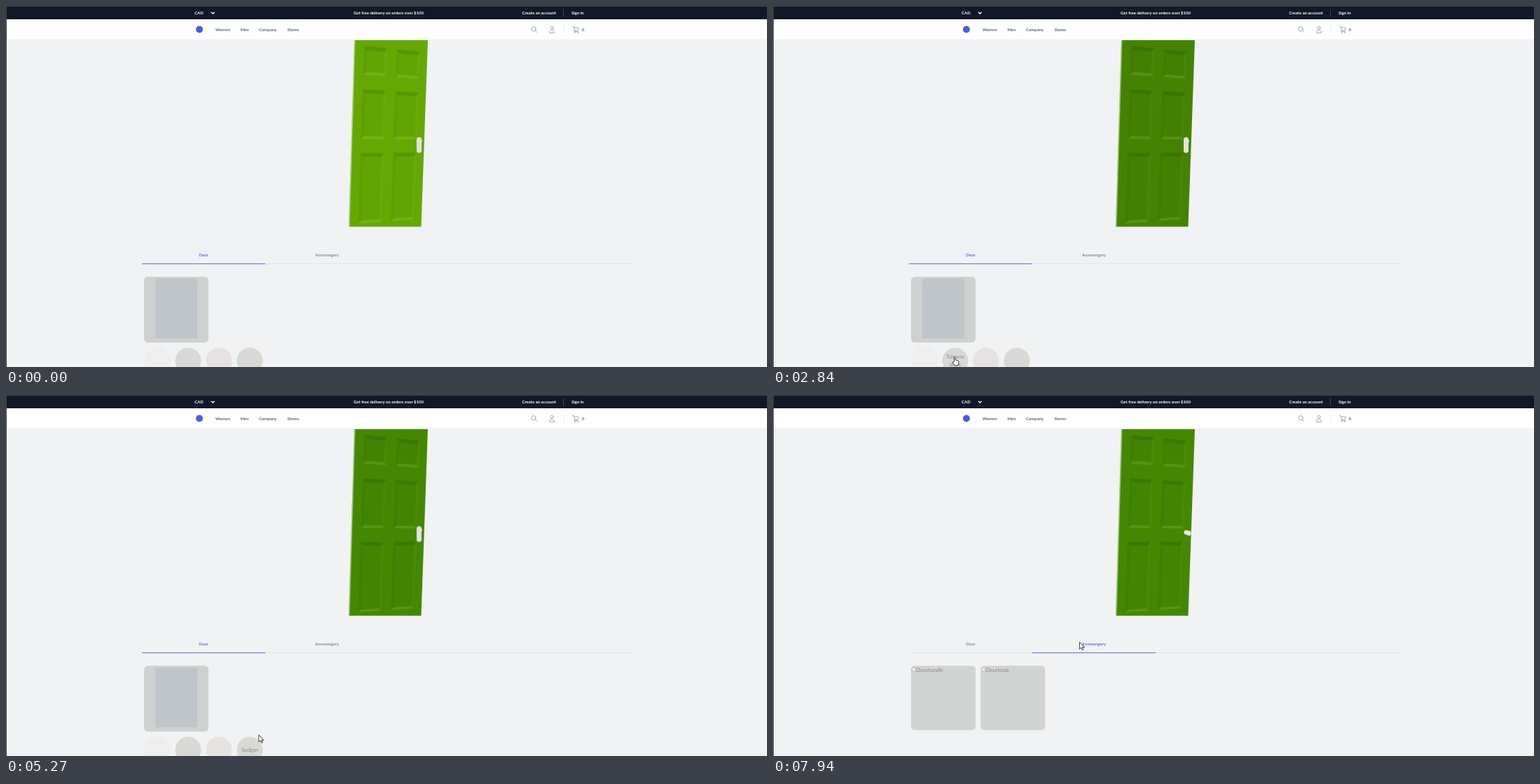
Animation of 1086x516 px, one loop 8 s. Source, as an HTML page:

```html
<!DOCTYPE html>
<html lang="en">
<head>
<meta charset="utf-8">
<title>Door configurator</title>
<style>
  html, body { margin: 0; width: 100%; height: 100%; overflow: hidden; background: #f0f2f4; }
  svg { display: block; width: 1086px; height: 516px; font: 500 6px Lato, sans-serif; }
  .bar { fill: #fff; font-weight: 700; }
  .nav { fill: #374151; }
  .icon { fill: none; stroke: #9ca3af; stroke-width: .9; stroke-linecap: round; stroke-linejoin: round; }
  .mid { text-anchor: middle; }
  .label { font-size: 7.4px; font-weight: 400; fill: #8a8a86; }
  .tab { fill: #6b7280; }
  .tab.hover { fill: #4b5563; }
  .tab.active { fill: #4f46e5; }
  .pointer { fill: #fff; stroke: #111; stroke-width: .8; }
</style>
</head>
<body>
<svg viewBox="0 0 1086 516">
  <path id="face" d="M497 48H602L592.5 315.5H489z"/>
  <path d="M497 48h1.5L490.5 315.5H489z" fill="#fff" opacity=".5"/>
  <g id="panels"></g>
  <g id="handle" fill="#dfe3de">
    <rect x="586" y="187.5" width="7" height="22.5" rx="3.4"/>
    <circle cx="592" cy="193" r="2"/>
  </g>
  <g id="knob" fill="#e2e5df">
    <ellipse cx="590" cy="196.5" rx="3.5" ry="3.2"/>
    <ellipse cx="593.5" cy="197.5" rx="3.2" ry="3.5"/>
  </g>

  <rect width="1086" height="19" fill="#111827"/>
  <rect y="19" width="1086" height="29.5" fill="#fff"/>
  <rect y="48" width="1086" height=".7" fill="#e2e4e8"/>
  <g class="bar">
    <text x="269" y="12">CAD</text>
    <text x="546" y="11.5" class="mid">Get free delivery on orders over $100</text>
    <text x="736.5" y="11.5">Create an account</text>
    <text x="807" y="11.5">Sign in</text>
  </g>
  <path d="M293 8.7l2.3 2.3 2.3-2.3" fill="none" stroke="#fff" stroke-width="1.3"/>
  <path d="M795.5 4.5v11" stroke="#4b5563" stroke-width=".8"/>
  <circle cx="276" cy="33.5" r="5" fill="#5157e8"/>
  <g class="nav">
    <text x="299" y="35.7">Women</text>
    <text x="334.5" y="35.7">Men</text>
    <text x="361" y="35.7">Company</text>
    <text x="401.5" y="35.7">Stores</text>
    <text x="821.8" y="35.7">0</text>
  </g>
  <g class="icon">
    <circle cx="753" cy="32.8" r="3.2"/>
    <path d="M755.4 35.2l2.6 2.6"/>
    <circle cx="779" cy="31.2" r="2"/>
    <path d="M775.5 38q0-3.8 3.5-3.8t3.5 3.8z"/>
    <path d="M808.5 29.5h1.7l1.6 5.8h4.3l1-4.3h-6.4M811.8 35.3l-.8 1.4h5.6"/>
    <circle cx="811.8" cy="38" r=".4"/><circle cx="816" cy="38" r=".4"/>
  </g>
  <path d="M796.3 28v11" stroke="#e5e7eb" stroke-width=".8"/>

  <path d="M194 368.5H897" stroke="#e1e3e7" stroke-width=".8"/>
  <path id="underline" d="M194 368.5h176" stroke="#6366f1"/>
  <text id="doorTab" class="mid" x="282" y="358.3">Door</text>
  <text id="ironTab" class="mid" x="458.3" y="358.3">Ironmongery</text>

  <g id="doorPane">
    <rect x="197" y="387" width="92" height="94" rx="5.5" fill="#cfd1d1"/>
    <rect x="213" y="389.5" width="60" height="85.5" fill="#c0c5ca"/>
    <path d="M221 408h18v60h-18zM247 408h18v60h-18z" fill="none" stroke="#bac0c5" stroke-width=".7"/>
  </g>
  <g id="ironPane"></g>

  <path d="M.5 0V516" stroke="#444"/>
  <path d="M0 .5H1086" stroke="#3a404c"/>
  <path id="arrow" class="pointer" d="M0 0V10.2L2.4 8.1 4 11.5 5.4 10.9 3.900 7.600H7z"/>
  <path id="hand" class="pointer" d="M2.5 7.300V1.500q0-1 .9-1t.9 1V5l3.600.8q1 .3 1 1.300v2.500l-1 3.300H3.300L.6 8.900q-.5-1 .4-1.300z"/>
</svg>
<script>
const LOOP = 8000, TAB_HOVER = 6110, TAB_CLICK = 6460, KNOB_CLICK = 7550, SAMPLE = 60;
const $ = id => document.getElementById(id);
const show = (id, on) => $(id).setAttribute('visibility', on ? 'inherit' : 'hidden');
const move = (id, x, y) => $(id).setAttribute('transform', `translate(${x} ${y})`);

// The door leans left, and its horizontals converge at handle height
const project = (x, y) => [x - .033 * (y - 57), y + (205 - y) * .0007 * (x - 511)];

function panel(left, top, height) {
  const corners = inset => {
    const l = left + inset, r = left + 33 - inset * .8, t = top + inset * 1.4, b = top + height - inset;
    return [project(l, t), project(r, t), project(r, b), project(l, b)];
  };
  const outer = corners(0), inner = corners(4);
  const poly = (points, fill, opacity) => `<polygon points="${points.join(' ')}" fill="${fill}" opacity="${opacity}"/>`;
  const bevel = (i, fill, opacity) => {
    const j = (i + 1) % 4;
    return poly([outer[i], outer[j], inner[j], inner[i]], fill, opacity);
  };
  return bevel(0, '#000', .12) + bevel(1, '#fff', .03) + bevel(2, '#fff', .1) +
    bevel(3, '#000', .06) + poly(inner, '#000', .025);
}
const rows = [[57, 41], [119, 71], [210, 101]];
$('panels').innerHTML = rows.map(([top, height]) =>
  panel(511, top, height) + panel(557.5, top, height)).join('');

const paints = [
  { click: 1670, door: '#68ab04', swatch: '#eeeeee', name: 'Froth' },
  { click: 2840, door: '#448300', swatch: '#d9d8d5', name: 'Tolmere shale' },
  { click: 4030, door: '#5a9d00', swatch: '#e6e3de', name: 'Drifting Shell' },
  { click: 5040, door: '#448800', swatch: '#d7d9d2', name: 'Sedgen' }
];
$('doorPane').innerHTML += paints.map(({ swatch, name }, i) => {
  const x = 216 + 44 * i, words = name.split(' ');
  const lines = words.map((word, n) => `<text x="${x}" y="${515 - 5.5 * words.length + 11 * n}">${word}</text>`);
  return `<circle cx="${x}" cy="507" r="18.5" fill="${swatch}"/>
    <g id="paint${i}" class="label mid">${lines.join('')}</g>`;
}).join('');

$('ironPane').innerHTML = ['Doorhandle', 'Doorknob'].map((name, i) =>
  `<g transform="translate(${197 + 99.3 * i} 387)">
    <rect width="92" height="92" rx="5.5" fill="#d2d3d3"/>
    <path d="M1 3h4l2 2v3l-2-1.5L3.5 8 1 6.5z" fill="#eceeef" stroke="#9a9fa3" stroke-width=".5"/>
    <text x="7.5" y="8.6" class="label">${name}</text>
  </g>`).join('');

const stops = [
  { from: 200, to: 500, x: 417, y: 471 },
  { from: 890, to: 1430, x: 215, y: 503 },
  { from: 1720, to: 1950, x: 265, y: 505 },
  { from: 2290, to: 2530, x: 256, y: 501 },
  { from: 3050, to: 3730, x: 291, y: 501 },
  { from: 4100, to: 4690, x: 354, y: 496 },
  { from: 5270, to: 6010, x: 443.5, y: 362 },
  { from: 6770, to: 7200, x: 354.5, y: 421 },
  { from: 7790, to: 7940, x: 437.5, y: 353 }
];
function pointerAt(t) {
  let x = 842, y = 439;
  for (const stop of stops) {
    if (t < stop.from) break;
    const done = Math.min(1, (t - stop.from + SAMPLE) / (stop.to - stop.from + SAMPLE));
    x += (stop.x - x) * done;
    y += (stop.y - y) * done;
  }
  return [x, y];
}

function draw(t) {
  const chosen = paints.findLastIndex(p => t >= p.click);
  const iron = t >= TAB_CLICK, knob = t >= KNOB_CLICK;
  $('face').setAttribute('fill', chosen < 0 ? '#65a802' : paints[chosen].door);
  paints.forEach((_, i) => show('paint' + i, i === chosen));
  show('handle', !knob);
  show('knob', knob);
  show('doorPane', !iron);
  show('ironPane', iron);

  move('underline', iron ? 176 : 0, 0);
  $('doorTab').setAttribute('class', iron ? 'mid tab' : 'mid tab active');
  $('ironTab').setAttribute('class', 'mid tab' + (iron ? ' active' : t >= TAB_HOVER ? ' hover' : ''));

  const [x, y] = pointerAt(t);
  const overSwatch = y > 488 && x < 366;
  move('arrow', x, y);
  move('hand', x, y);
  show('arrow', t >= 20 && !overSwatch);
  show('hand', overSwatch);
}

const began = performance.now();
function tick() {
  draw((performance.now() - began) % LOOP);
  requestAnimationFrame(tick);
}
tick();
</script>
</body>
</html>
```
